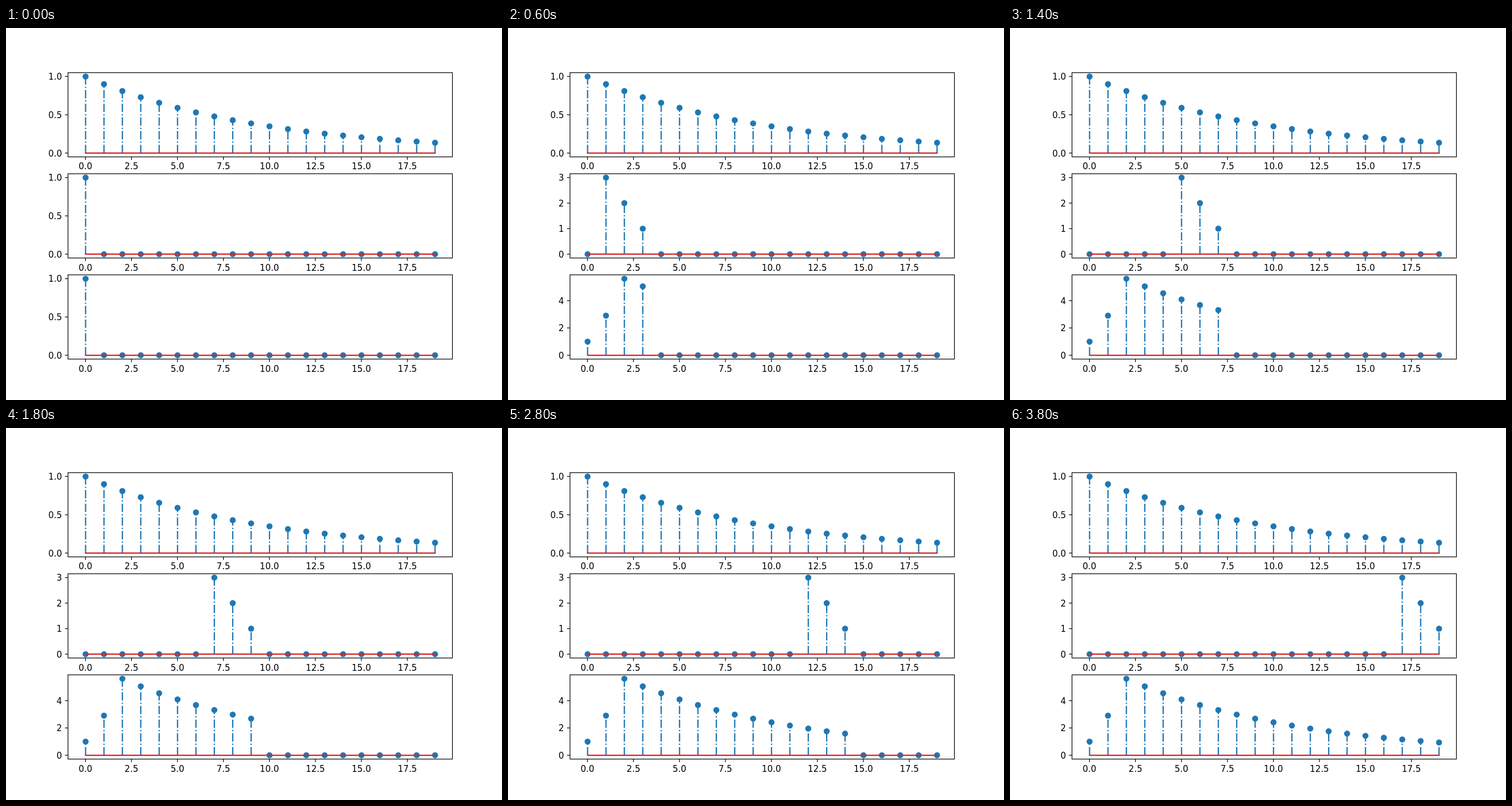
An HTML page with a canvas that plays this animation: 864 by 648 pixels, repeating every 4000 ms.

```html
<!DOCTYPE html>
<html lang="en">
<head>
<meta charset="utf-8">
<title>Convolution stems</title>
<style>
html, body { margin: 0; width: 100%; height: 100%; overflow: hidden; background: #fff; }
canvas { display: block; }
</style>
</head>
<body>
<canvas id="stage" width="864" height="648"></canvas>
<script>
const ctx = document.getElementById('stage').getContext('2d');
const COUNT = 20, STEP_MS = 200;
const PT = 1.5; // pixels per point
const LEFT = 108, RIGHT = 777.6, TOP = 77.76, HEIGHT = 498.96 / 3.4;
const BLUE = '#1f77b4', RED = '#d62728';
const UNIT = (RIGHT - LEFT) / 20.9;
const toX = n => LEFT + (n + 0.95) * UNIT;

const decay = n => 0.9 ** n;
const pulse = n => n >= 0 && n < 3 ? n + 1 : 0;
const response = n => [0, 1, 2].reduce((sum, j) => sum + (n >= j ? pulse(j) * decay(n - j) : 0), 0);
const series = f => Array.from({ length: COUNT }, (_, n) => f(n));

function line(x1, y1, x2, y2, color, width, dash = []) {
  ctx.strokeStyle = color;
  ctx.lineWidth = width;
  ctx.setLineDash(dash);
  ctx.beginPath();
  ctx.moveTo(x1, y1);
  ctx.lineTo(x2, y2);
  ctx.stroke();
}

function label(text, x, y, align) {
  ctx.fillStyle = '#000';
  ctx.textAlign = align;
  ctx.fillText(text, x, y);
}

function panel(row, values) {
  const top = TOP + row * HEIGHT * 1.2, bottom = top + HEIGHT;
  const max = Math.max(...values);
  const toY = v => bottom - (v / max + 0.05) * HEIGHT / 1.1;
  const zero = toY(0), stroke = 1.5 * PT, shift = 0.2;

  values.forEach((v, n) => {
    const x = toX(n) + shift;
    if (v) line(x, zero, x, toY(v), BLUE, stroke, [6.4, 1.6, 1, 1.6].map(d => d * stroke));
  });
  ctx.fillStyle = BLUE;
  values.forEach((v, n) => {
    ctx.beginPath();
    ctx.arc(toX(n) + shift, toY(v), 3.5 * PT, 0, 7);
    ctx.fill();
  });
  ctx.lineCap = 'square';
  line(toX(0) + shift, zero, toX(COUNT - 1) + shift, zero, RED, stroke);
  ctx.lineCap = 'butt';

  const thin = 0.8 * PT, tick = 3.5 * PT;
  for (let n = 0; n < COUNT; n += 2.5) {
    line(toX(n), bottom, toX(n), bottom + tick, '#000', thin);
    label(n.toFixed(1), toX(n), bottom + 2 * tick + 11.4, 'center');
  }
  const raw = max * 1.1 / 4;
  const step = [0.5, 1, 2].find(s => s >= raw);
  for (let v = 0; v <= max; v += step) {
    line(LEFT - tick, toY(v), LEFT, toY(v), '#000', thin);
    label(v.toFixed(step < 1 ? 1 : 0), LEFT - 2 * tick, toY(v) + 5.7, 'right');
  }
  ctx.strokeRect(LEFT, top, RIGHT - LEFT, HEIGHT);
}

function draw() {
  const k = Math.floor(performance.now() / STEP_MS) % COUNT;
  ctx.fillStyle = '#fff';
  ctx.fillRect(0, 0, 864, 648);
  ctx.font = '15px "DejaVu Sans", sans-serif';
  panel(0, series(decay));
  panel(1, series(n => pulse(k - n)));
  panel(2, series(n => n <= k ? response(n) : 0));
  requestAnimationFrame(draw);
}
draw();
</script>
</body>
</html>
```
